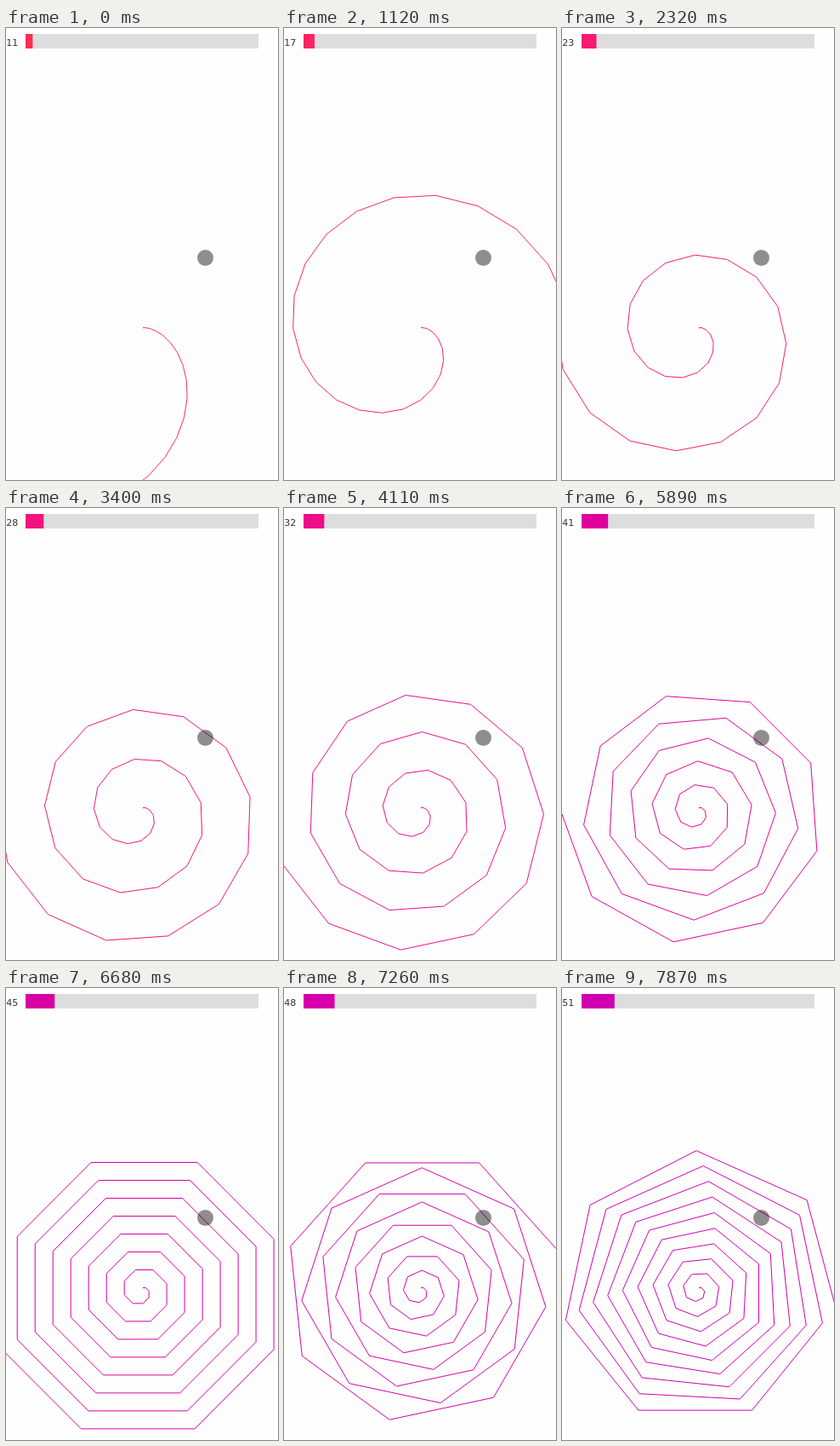
Animation, 320 px wide and 530 px high, one loop 8000 ms. Source, as an HTML page:

```html
<!DOCTYPE html>
<html lang="en">
<head>
<meta charset="utf-8">
<title>Turning spiral</title>
<style>
  html, body { margin: 0; width: 100%; height: 100%; overflow: hidden; background: #fefefe; }
  svg { display: block; width: 320px; height: 530px; }
  text { font: 11px "DejaVu Sans", sans-serif; fill: #333; }
</style>
</head>
<body>
<svg viewBox="0 0 320 530">
  <text id="label" x="0.2" y="20.5"></text>
  <rect x="23" y="7" width="274" height="17" fill="#ddd"/>
  <rect id="bar" x="23" y="7" height="17"/>
  <path id="spiral" fill="none" stroke-width="1"/>
  <circle cx="234.5" cy="269.5" r="9.5" fill="#000" fill-opacity=".44"/>
</svg>
<script>
const LOOP = 8000, W = 320, H = 530;
const START = { x: 161, y: 351.5 };
const GROWTH = 2.1746, FIRST = 1.5;
const FIRST_ANGLE = 11;

// Bursts of single-degree steps: [first time, last time, steps]
const BURSTS = [
  [120, 120, 1], [390, 390, 1], [670, 1120, 4], [1400, 2320, 6],
  [2620, 3400, 5], [3560, 3560, 1], [3700, 3700, 1], [3980, 4110, 2],
  [4380, 4530, 2], [4810, 5280, 4], [5590, 5890, 3], [6160, 6680, 4],
  [6960, 7260, 3], [7570, 7870, 3]
];
const ticks = BURSTS.flatMap(([from, to, n]) =>
  Array.from({ length: n }, (_, i) => from + (n > 1 ? (to - from) * i / (n - 1) : 0)));

// Angle to colour
const STOPS = [
  [11, 255, 45, 85], [23, 248, 26, 115], [28, 243, 19, 127],
  [35, 233, 9, 144], [41, 224, 2, 156], [45, 217, 0, 164], [51, 208, 0, 176]
];

const [label, bar, spiral] = ["label", "bar", "spiral"].map(id => document.getElementById(id));

function colour(angle) {
  let i = 1;
  while (i < STOPS.length - 1 && angle > STOPS[i][0]) i++;
  const a = STOPS[i - 1], b = STOPS[i];
  const k = (angle - a[0]) / (b[0] - a[0]);
  return `rgb(${[1, 2, 3].map(c => Math.round(a[c] + (b[c] - a[c]) * k))})`;
}

// Walk with growing strides and a fixed turn until the stage is left
function trace(angle) {
  let { x, y } = START;
  let d = `M${x} ${y}`;
  for (let i = 0; i < 400 && x >= 0 && x <= W && y >= 0 && y <= H; i++) {
    const stride = GROWTH * (i + FIRST), turn = i * angle * Math.PI / 180;
    x += stride * Math.cos(turn);
    y += stride * Math.sin(turn);
    d += `L${x.toFixed(2)} ${y.toFixed(2)}`;
  }
  return d;
}

let shown;
function draw(angle) {
  if (angle === shown) return;
  shown = angle;
  const c = colour(angle);
  label.textContent = angle;
  bar.setAttribute("width", 274 * angle / 360);
  bar.setAttribute("fill", c);
  spiral.setAttribute("stroke", c);
  spiral.setAttribute("d", trace(angle));
}

const origin = performance.now();
function frame() {
  const t = (performance.now() - origin) % LOOP;
  draw(FIRST_ANGLE + ticks.filter(tick => tick <= t + 0.5).length);
  requestAnimationFrame(frame);
}
frame();
</script>
</body>
</html>
```
